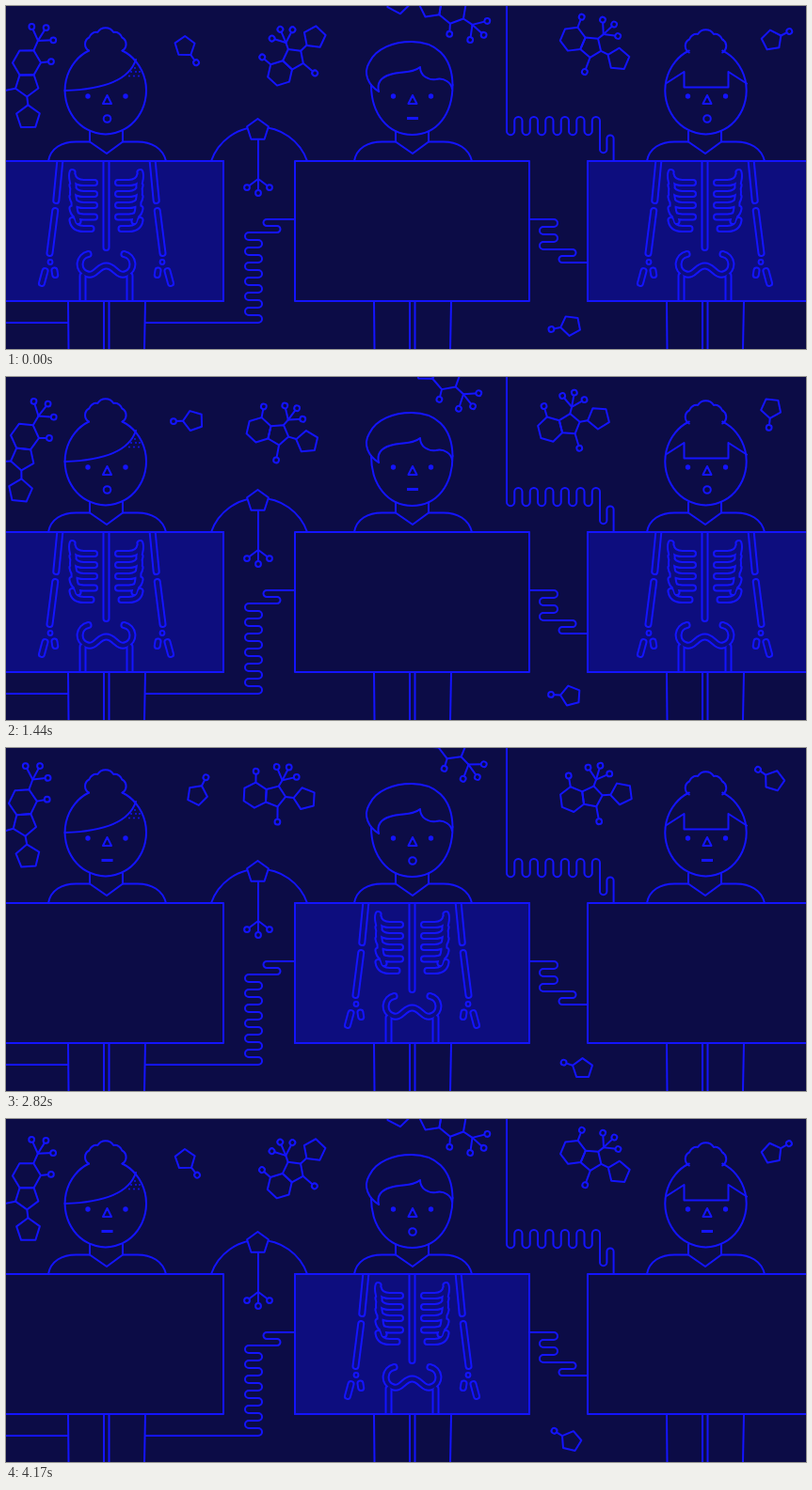
These frames come from a looping animation (850x365 px, 4200 ms). An HTML page:

```html
<!DOCTYPE html>
<html lang="en">
<head>
<meta charset="utf-8">
<title>X-ray line-up</title>
<style>
  html, body { margin: 0; width: 100%; height: 100%; overflow: hidden; background: #0c0c46; }
  svg { display: block; width: 850px; height: 365px; }
  .line { fill: none; stroke: #1414ff; stroke-width: 2; stroke-linejoin: round; stroke-linecap: round; }
  .node { fill: #0c0c46; }
  .dot { fill: #1414ff; stroke: none; }
  .bone { stroke-width: 8; }
  .marrow { stroke: #0d0d7e; stroke-width: 4; }
</style>
</head>
<body>
<svg id="stage" viewBox="0 0 850 365"></svg>
<script>
const LOOP = 4200, STEP = 30, SWITCH = 2100;
const KEY_TIMES = [0, 540, 1440, 2040, 2400, 3240, LOOP];
const stage = document.getElementById('stage');

const path = (d, cls = '') => `<path class="${cls}" d="${d}"/>`;
const circle = (x, y, r, cls = 'node') => `<circle class="${cls}" cx="${x}" cy="${y}" r="${r}"/>`;
const node = ([x, y]) => circle(x, y, 2.9);
const line = (a, b) => path(`M${a}L${b}`);
const polar = ([x, y], r, deg) => {
  const a = deg * Math.PI / 180;
  return [x + r * Math.cos(a), y + r * Math.sin(a)];
};
const polygon = (c, r, n, start = 0, cls = '') =>
  path('M' + Array.from({ length: n }, (_, i) => polar(c, r, start + i * 360 / n)).join('L') + 'Z', cls);
const bond = (a, b) => line(a, b) + node(b);
const trident = (hub, r, dir, spread) =>
  [-spread, 0, spread].map(s => bond(hub, polar(hub, r, dir + s))).join('');

// Molecules, drawn with the hexagon-to-pentagon axis along +x
function chainMolecule() {
  const hex = [0, 0], pent = [23.3, 0], hub = polar(hex, 26.4, -152.5);
  return polygon(hex, 15, 6, 30) + polygon(pent, 12.8, 5) + polygon([58, -1], 13, 5, 180) +
    line([36.1, 0], [45, -1]) + line(polar(pent, 12.8, 72), polar(pent, 30, 76)) +
    bond([0, -15], polar(hex, 26, -92.5)) + line(polar(hex, 15, -150), hub) + trident(hub, 16.3, -147.5, 56);
}

function branchMolecule() {
  const hex = [-21, 0], pent = [0, 0], hub = polar(pent, 18.8, -68);
  return polygon(hex, 13.5, 6, 30) + polygon(pent, 11.5, 5) + polygon([32, 0.8], 12, 5, 180) +
    line([11.5, 0], [20, 0.5]) + bond(polar(hex, 13.5, -90), polar(hex, 25.4, -91)) +
    bond(polar(pent, 11.5, 72), polar(pent, 27.5, 81)) +
    line(polar(pent, 11.5, -72), hub) + trident(hub, 15.5, -66, 50);
}

const smallMolecule = () => polygon([0, 0], 11, 5) + bond([11, 0], [21, 0]);

const spin = (from, sweep) => t => from + sweep * t / LOOP;

// Smooth curve through the key poses; tangents wrap around the loop
function curve(values) {
  const v = values.length < 7 ? [...values, values[0]] : values;
  const T = KEY_TIMES;
  const slope = i => i % 6
    ? (v[i + 1] - v[i - 1]) / (T[i + 1] - T[i - 1])
    : (v[1] - v[0] + v[6] - v[5]) / (T[1] + T[6] - T[5]);
  return t => {
    const i = Math.max(0, T.findIndex(k => k > t) - 1);
    const h = T[i + 1] - T[i], s = (t - T[i]) / h, r = 1 - s;
    return r * r * ((1 + 2 * s) * v[i] + s * h * slope(i)) +
      s * s * ((3 - 2 * s) * v[i + 1] - r * h * slope(i + 1));
  };
}

const floaters = [
  { art: chainMolecule(),
    x: curve([22, 22, 20, 18, 17, 19.2]),
    y: curve([60.4, 63, 63.5, 61, 59.3, 57]),
    a: curve([89.5, 92.2, 95.8, 90.5, 87.5, 85.2]) },
  { art: chainMolecule(),
    x: curve([474.4, 472, 468, 470, 473.6, 474.5]),
    y: curve([4, 2.5, -1, -4, -4.8, 0]),
    a: curve([189.5, 193.5, 199.5, 205.5, 206.5, 197.5]) },
  { art: branchMolecule(),
    x: curve([305.4, 301, 289, 281.5, 283, 289.5]),
    y: curve([56.1, 59.8, 61, 56.5, 53.5, 50.5]),
    a: curve([-47, -24, 13, 32, 20, -13.5]) },
  { art: branchMolecule(),
    x: curve([621.5, 613.4, 598.5, 609.5, 614.3, 628]),
    y: curve([43.4, 48.8, 50.5, 45, 49.3, 52.4]),
    a: curve([23, 13, -14, -24, -18, 3]) },
  { art: smallMolecule(),
    x: curve([190, 187, 199, 204, 205, 200]),
    y: curve([43, 45, 46.5, 56, 55.5, 45]),
    a: spin(55, 360) },
  { art: smallMolecule(),
    x: curve([813.6, 812.5, 813, 815, 816, 816]),
    y: curve([36.5, 35.5, 33, 33, 33.5, 36]),
    a: spin(-27, 360) },
  { art: smallMolecule(),
    x: curve([600, 593, 600, 607, 612, 611, 600]),
    y: curve([340, 343, 339.3, 344, 345, 338, 343]),
    a: spin(169, 43) }
];

// Cables
const turn = (r, sweep, dx, dy) => `a${r} ${r} 0 0 ${sweep} ${dx} ${dy}`;

function cables() {
  let left = 'M148 337H268';
  for (let i = 0; i < 12; i++) left += turn(4, i % 2, 0, -8) + `H${i === 11 ? 288 : i % 2 ? 268 : 258}`;
  left += turn(3.5, 0, 0, -7) + 'H277' + turn(3.5, 1, 0, -7) + 'H307';

  let right = 'M556 227H582';
  [571, 582, 571, 602].forEach((x, i) => right += turn(4, 1 - i % 2, 0, 8) + `H${x}`);
  right += turn(3.5, 1, 0, 7) + 'H591' + turn(3.5, 0, 0, 7) + 'H618';

  let top = 'M532 0V133';
  for (let i = 0; i < 12; i++) top += turn(4.125, i % 2, 8.25, 0) + `V${i === 11 ? 152.5 : i % 2 ? 133 : 122}`;
  top += turn(3.7, 0, 7.4, 0) + 'V141' + turn(3.6, 1, 7.2, 0) + 'V165';

  const fork = [268, 184];
  return path('M0 337H66') + path(left) + path(right) + path(top) +
    path('M218 165A54 54 0 0 1 320 165') + polygon([267.5, 132], 12, 5, -90, 'node') +
    line([268, 142], fork) + trident(fork, 15, 90, 53);
}

// People
const bunHead = (x, bunDrop) => `<g transform="translate(${x})">` +
  path('M-17.75 47.5A43.2 46.5 0 1 0 17.75 47.5') +
  `<g transform="translate(0 ${bunDrop})">` +
  path('M-17.75 47.5A8 8 0 0 1 -17.5 33.5A8 8 0 0 1 -8.5 28A10 10 0 0 1 8.5 28A8 8 0 0 1 17.5 33.5A8 8 0 0 1 17.75 47.5') +
  '</g></g>';

const hair = [
  bunHead(105.8, 0) + path('M62.5 90C96 89 130 82 138 57') +
    [[137, 66], [133, 70], [138, 70], [142, 70], [131, 74.5], [136, 74.5], [141, 74.5]]
      .map(([x, y]) => circle(x, y, 0.9, 'dot')).join(''),
  path('M388 84C388 115 406 137 431.5 137C458 137 474.5 115 474.5 84') +
    path('M396 91C385 84 379 72 386 60C393 45 412 38 431 38C455 38 474 52 474.5 84') +
    path('M396 91C394 82 398 76 408 73C420 69 432 72 440 65C440 74 448 79 457 78C466 76 473 82 474 88'),
  bunHead(743.5, 2) + path('M701 82.5L720.5 70V86.5H767.5V70L787 82.5')
];

const body = x => `<g transform="translate(${x})">` +
  path('M-61.5 165C-59 151 -47 144.5 -32 144.5H-17.5L0.5 157L17.5 144.5H33C48 144.5 60 151 63.5 165') +
  path('M-17.5 133.5V144.5M17.5 133.5V144.5M-40.5 314L-40 365M-2.5 314V365M3 314V365M41.5 314L40.5 365') +
  '</g>';

const face = x => circle(x - 20, 96, 2.7, 'dot') + circle(x + 20, 96, 2.7, 'dot') +
  path(`M${x + 0.5} 95L${x + 5} 104H${x - 4}Z`);

const mouths = x => ({
  open: circle(x + 0.5, 120, 3.8, ''),
  shut: `<rect class="dot" x="${x - 5.5}" y="118" width="12" height="3"/>`
});

function skeleton(x) {
  const ribs = [188, 200, 212, 224.5, 237]
    .map((y, i) => `M${i === 4 ? -16 : -12.5} ${y}H-24C-31 ${y} -35 ${y - 3} -36 ${y - 9}`).join('');
  const side = ribs + 'M-36 177C-38 184 -34 188 -35 194C-37 202 -33 206 -34 214C-34 220 -31 224 -30 229' +
    'M-48.5 158L-53.2 207M-54.3 218L-60 263M-65 282L-68.5 295M-55 281.5L-54.3 286M-25 287V325';
  const pelvis = 'M-19 264A11 11 0 0 0 -21 285C-12 289 -9 276.5 0 276.5C9 276.5 12 289 21 285A11 11 0 0 0 19 264';
  const layer = cls => path(side, cls) + `<g transform="scale(-1 1)">${path(side, cls)}</g>` +
    path('M0 155V257' + pelvis, cls);
  return `<g transform="translate(${x})">` + layer('bone') + layer('marrow') +
    circle(-59.5, 272.5, 2.4, '') + circle(59.5, 272.5, 2.4, '') + '</g>';
}

const people = [[106.5, 107], [431.5, 431.5], [742.5, 744.5]].map(([x, faceX], i) => {
  const frame = fill => `<rect x="${x - 124.5}" y="165" width="249" height="149" fill="${fill}"/>`;
  const mouth = mouths(faceX);
  return `<clipPath id="screen${i}"><rect x="${x - 124.5}" y="165" width="249" height="149"/></clipPath>` +
    body(x) + hair[i] + face(faceX) +
    `<g class="lit">${frame('#0d0d7e')}<g clip-path="url(#screen${i})">${skeleton(x)}</g>${frame('none')}${mouth.open}</g>` +
    `<g class="unlit">${frame('#0c0c46')}${mouth.shut}</g>`;
});

stage.innerHTML = '<g class="line">' + cables() +
  floaters.map(f => `<g class="floater">${f.art}</g>`).join('') + people.join('') + '</g>';

const floaterEls = stage.querySelectorAll('.floater');
const litEls = stage.querySelectorAll('.lit');
const unlitEls = stage.querySelectorAll('.unlit');

function draw(t) {
  floaters.forEach((f, i) => floaterEls[i].setAttribute('transform',
    `translate(${f.x(t).toFixed(2)} ${f.y(t).toFixed(2)}) rotate(${f.a(t).toFixed(2)})`));
  litEls.forEach((el, i) => {
    const lit = (i !== 1) === (t < SWITCH);
    el.style.display = lit ? '' : 'none';
    unlitEls[i].style.display = lit ? 'none' : '';
  });
}

function tick() {
  draw(Math.floor(performance.now() % LOOP / STEP) * STEP);
  requestAnimationFrame(tick);
}
draw(0);
requestAnimationFrame(tick);
</script>
</body>
</html>
```
